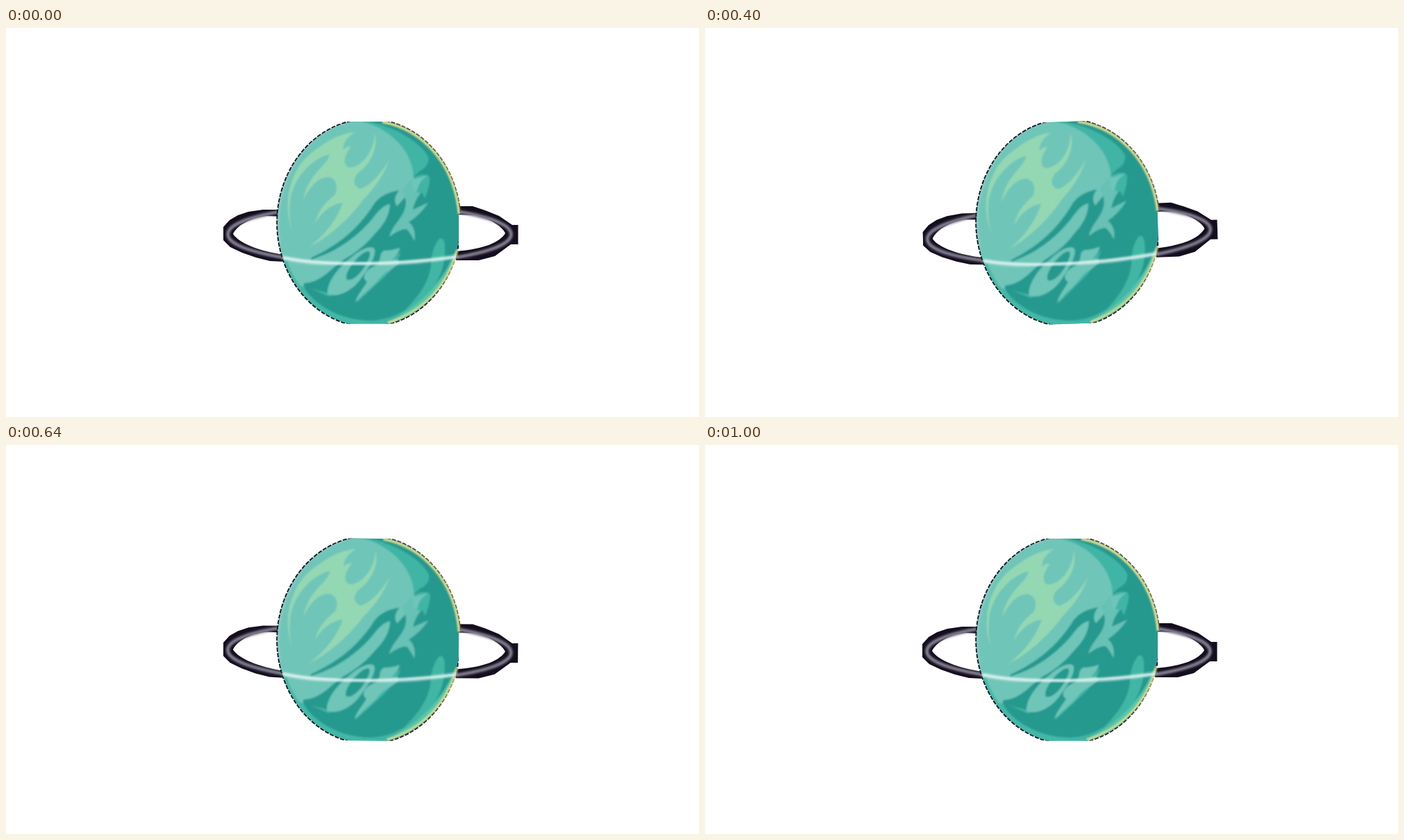
These frames come from a looping animation (998x561 px, 1.04 s). An HTML page:

```html
<!DOCTYPE html>
<html lang="en">
<head>
<meta charset="utf-8">
<title>Wobbling planet</title>
<style>
  html, body { margin: 0; width: 100%; height: 100%; overflow: hidden; background: #fff; }
  svg { display: block; width: 100%; height: 100%; }
</style>
</head>
<body>
<svg viewBox="0 0 998 561">
  <defs>
    <clipPath id="crop"><path d="M313 135H737.500V426.500H313Z"/></clipPath>
    <clipPath id="disc"><ellipse cx="522.5" cy="281" rx="131.5" ry="149"/></clipPath>
    <clipPath id="globe"><path d="M380 130H665V268H652V318H665V430H380Z"/></clipPath>
    <clipPath id="sides"><path d="M300 240H400V350H300ZM650 240H745V350H650Z"/></clipPath>
    <filter id="soft" x="-10%" y="-10%" width="120%" height="120%"><feGaussianBlur stdDeviation=".9"/></filter>
    <filter id="glow" x="-10%" y="-20%" width="120%" height="140%"><feGaussianBlur stdDeviation="1.5"/></filter>
    <ellipse id="orbit" cx="523.5" cy="297.5" rx="204" ry="42"/>
  </defs>

  <g id="planet"><g clip-path="url(#crop)">
    <!-- ring -->
    <path fill="#130d1e" fill-rule="evenodd" d="M400 262H370L349 265 334 270 322 277 313 287V306L323 316 340 324 360 331 380 336 400 337ZM400 272 375 271C354 273 333 284 327 297C335 310 365 322 400 327Z"/>
    <path fill="#130d1e" fill-rule="evenodd" d="M648 257H672L690 263 710 271 729 284H738V312H727L704 329 681 335H648ZM648 269 675 270C699 275 716 288 719 296C712 308 690 319 648 322Z"/>
    <g clip-path="url(#sides)" fill="none">
      <use href="#orbit" stroke="#777384" stroke-width="5" filter="url(#glow)"/>
      <use href="#orbit" stroke="#aaa7b4" stroke-width="1.3" opacity=".55" filter="url(#soft)"/>
    </g>

    <!-- globe -->
    <g clip-path="url(#globe)">
      <ellipse cx="522.5" cy="281" rx="132" ry="149.5" fill="#41b5a5" stroke="#171421" stroke-width="2.5" stroke-dasharray="6 2"/>
      <g clip-path="url(#disc)"><g filter="url(#soft)">
        <rect x="385" y="130" width="275" height="300" fill="#41b5a5"/>
        <path d="M523 135C568 145 600 169 608 186Q610 199 596 206L584 217Q601 207 610 215C611 231 601 250 596 264L607 254Q600 278 588 286C590 298 587 305 582 307Q566 303 560 306L570 320Q562 343 545 359L505 396 515 370 465 387 428 371C438 395 480 423 525 422C576 421 612 380 650 330L660 250C650 200 620 155 560 130Z" fill="#28998f"/>
        <path d="M512 135C556 145 588 182 587 218L609 212Q594 220 592 235L566 254 520 324 430 374C410 370 385 320 385 280V130Z" fill="#70c5b9"/>
        <path d="M440 331C487 309 509 284 526 260C536 242 550 237 566 234Q556 248 563 257L578 240 600 238 607 256 588 306 564 327 538 351 506 391 474 385 428 373Z" fill="#28998f"/>
        <path d="M570 234Q579 248 574 262C570 275 556 285 552 301Q572 287 578 291 584 298 588 307C591 295 586 284 580 280Q596 270 608 252L586 262Q588 250 597 238L587 236 584 217Z" fill="#68c1b5"/>
        <path d="M425 368C416 351 428 339 445 332C482 321 515 292 530 272Q543 255 553 254C552 272 543 285 530 298C520 311 505 323 488 333C468 345 455 369 425 368Z" fill="#70c5b9"/>
        <path d="M463 384C462 366 478 346 498 330C512 318 529 312 531 320C533 330 520 350 512 360C503 374 483 390 463 384Z" fill="#70c5b9"/>
        <path d="M491 363C486 356 500 335 514 325C523 319 526 322 523 331C517 347 502 366 491 363Z" fill="#28998f"/>
        <path d="M503 396C506 384 516 374 520 366C511 361 517 349 531 343C543 338 535 325 545 321Q556 321 567 317 566 326 556 334 567 333 566 339C556 349 545 352 539 360C530 372 515 382 503 396Z" fill="#70c5b9"/>
        <path d="M412 292C398 255 408 205 440 180C462 163 480 152 503 150C490 158 486 165 485 176Q491 170 497 171C488 182 484 195 492 201C510 203 530 180 531 152C536 172 526 195 508 208C498 218 500 228 510 232C525 228 540 210 552 190C543 215 527 235 514 248C500 268 470 299 436 316C462 297 478 273 485 252C471 253 455 264 445 282C450 260 464 249 474 240C479 228 475 218 466 215C450 214 438 228 428 248C432 225 445 210 455 200Q466 188 466 182C440 188 413 217 409 250Q407 274 412 292Z" fill="#94d8b3"/>
        <path d="M624 304Q633 300 632 323C632 361 603 400 558 423C590 394 609 370 612 342Q613 317 624 304Z" fill="#43b6a5"/>
        <path d="M652 318C637 366 602 407 552 423C600 398 630 365 645 326Z" fill="#56c8ad"/>
        <path d="M402 335C420 390 465 423 525 425" fill="none" stroke="#42b9a6" stroke-width="5"/>
        <path d="M394 310C381 235 425 150 487 137" fill="none" stroke="#86c9c2" stroke-width="4"/>
      </g></g>
      <g fill="none" stroke="#e6df8f" stroke-width="3.6" filter="url(#soft)">
        <path d="M542 135.500C600 146 646 196 652.500 268"/>
        <path d="M650 320C637 369 603 408 550 425" stroke-width="3"/>
      </g>
    </g>
    <path d="M398 331C442 341 480 340.500 525 340.500Q595 339 650 329" fill="none" stroke="#d9f3ef" stroke-width="6" opacity=".5" filter="url(#glow)"/>
    <path d="M400 331.500C444 340 482 339.500 525 339.500Q594 338 648 330" fill="none" stroke="#e8f7f5" stroke-width="3.500" opacity=".7" filter="url(#soft)"/>
  </g></g>
</svg>

<script>
  const LOOP = 1040, TICK = 40;
  // [ms, degrees] turning points of the wobble
  const turns = [[0, 0], [140, 2.15], [425, -2.1], [575, 1.5], [720, -0.75], [1000, 0], [LOOP, 0]];
  const planet = document.getElementById('planet');
  const ease = p => (1 - Math.cos(Math.PI * p)) / 2;

  function angle(t) {
    const i = turns.findIndex(([ms]) => ms > t);
    const [t0, a0] = turns[i - 1], [t1, a1] = turns[i];
    return a0 + (a1 - a0) * ease((t - t0) / (t1 - t0));
  }

  let start;
  function draw(now) {
    start ??= now;
    const t = Math.floor(((now - start) % LOOP) / TICK + 0.01) * TICK % LOOP;
    planet.setAttribute('transform', `rotate(${angle(t).toFixed(3)} 525 281)`);
    requestAnimationFrame(draw);
  }
  requestAnimationFrame(draw);
</script>
</body>
</html>
```
